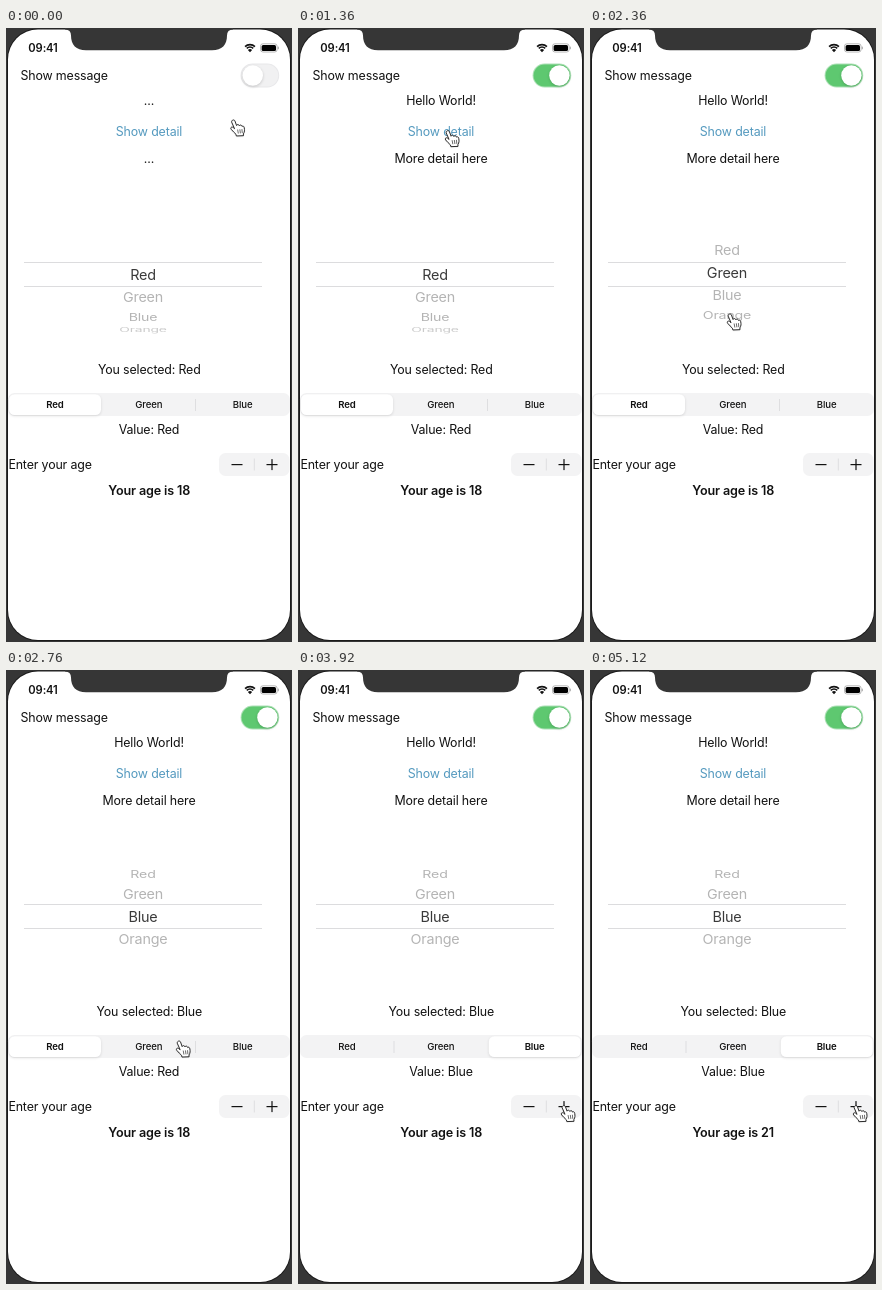
Write an HTML page with a canvas that moves like this. It is 286 by 614 pixels and loops after 5200 ms.

```html
<!DOCTYPE html>
<html lang="en">
<head>
<meta charset="utf-8">
<title>Form controls</title>
<style>
  html, body { margin: 0; width: 100%; height: 100%; overflow: hidden; background: #363636; }
  canvas { display: block; width: 286px; height: 614px; }
</style>
</head>
<body>
<canvas id="stage"></canvas>
<script>
const W = 286, H = 614, LOOP = 5200, STEP = 40;
const canvas = document.getElementById('stage');
const ctx = canvas.getContext('2d');
const dpr = window.devicePixelRatio || 1;
canvas.width = W * dpr;
canvas.height = H * dpr;

const INK = '#121212', BEZEL = '#363636', TRACK = '#f3f3f4', DIVIDER = '#dedee0', LINE = '#dcdcde';
const COLORS = ['Red', 'Green', 'Blue', 'Orange'];

// Pointer legs: start, end, target, optional control point of a curve
const START = [231.5, 99.8];
const LEGS = [
  { from: 0, to: 540, end: [260, 57] },
  { from: 740, to: 1180, end: [154, 110.5] },
  { from: 1400, to: 1970, end: [144, 293.8] },
  { from: 2470, to: 2990, end: [246, 383], bend: [140, 406] },
  { from: 3440, to: 3930, end: [270, 443.5] }
];
const PRESSES = [4120, 4480, 4920];

const clamp = v => Math.max(0, Math.min(1, v));
const progress = (t, a, b) => clamp((t - a) / (b - a));
const smooth = p => p * p * (3 - 2 * p);
const easeOut = p => 1 - (1 - p) ** 3;
const mix = (a, b, p) => a + (b - a) * p;
const mixRgb = (a, b, p) => `rgb(${a.map((v, i) => Math.round(mix(v, b[i], p))).join()})`;

function text(str, x, y, { size = 12.4, weight = 400, color = INK, align = 'center' } = {}) {
  ctx.font = `${weight} ${size}px Inter, "Liberation Sans", sans-serif`;
  ctx.letterSpacing = `${-0.012 * size}px`;
  ctx.textAlign = align;
  ctx.fillStyle = color;
  ctx.fillText(str, x, y);
}

function box(x, y, w, h, r, color) {
  ctx.beginPath();
  ctx.roundRect(x, y, w, h, r);
  ctx.fillStyle = color;
  ctx.fill();
}

function rect(x, y, w, h, color) {
  ctx.fillStyle = color;
  ctx.fillRect(x, y, w, h);
}

function withShadow(alpha, blur, dy, draw) {
  ctx.save();
  ctx.shadowColor = `rgba(0,0,0,${alpha})`;
  ctx.shadowBlur = blur * dpr;
  ctx.shadowOffsetY = dy * dpr;
  draw();
  ctx.restore();
}

function drawScreen() {
  rect(0, 0, W, H, BEZEL);
  box(1, 0.5, 284, 612.5, 31, '#1a1a1a');
  box(2, 1.5, 282, 610.5, 30, '#fff');
}

function drawNotch() {
  ctx.beginPath();
  ctx.moveTo(59, 0);
  ctx.lineTo(59, 1.5);
  ctx.quadraticCurveTo(65, 1.5, 65, 7.5);
  ctx.bezierCurveTo(65, 17, 70, 22.3, 80, 22.3);
  ctx.lineTo(206, 22.3);
  ctx.bezierCurveTo(216, 22.3, 221, 17, 221, 7.5);
  ctx.quadraticCurveTo(221, 1.5, 227, 1.5);
  ctx.lineTo(227, 0);
  ctx.fillStyle = BEZEL;
  ctx.fill();
}

function drawStatusBar() {
  text('09:41', 37, 24, { size: 11.2, weight: 600 });

  ctx.strokeStyle = ctx.fillStyle = INK;
  ctx.lineWidth = 1.6;
  for (const r of [7, 4.6]) {
    ctx.beginPath();
    ctx.arc(244, 23.6, r, -Math.PI * 0.75, -Math.PI * 0.25);
    ctx.stroke();
  }
  ctx.beginPath();
  ctx.moveTo(244, 24.2);
  ctx.arc(244, 24.2, 3, -Math.PI * 0.75, -Math.PI * 0.25);
  ctx.fill();

  ctx.beginPath();
  ctx.roundRect(254.5, 15.8, 16.6, 8.2, 2.4);
  ctx.strokeStyle = '#a5a5a5';
  ctx.lineWidth = 0.8;
  ctx.stroke();
  box(255.6, 16.9, 14.4, 6, 1.5, '#000');
  box(271.8, 18.6, 1, 2.6, 0.5, '#a5a5a5');
}

function drawToggle(t) {
  const p = progress(t, 560, 745);
  box(234.6, 35.6, 38.6, 23.8, 11.9, mixRgb([232, 232, 234], [172, 224, 181], p));
  box(235.6, 36.6, 36.6, 21.8, 10.9, mixRgb([241, 241, 242], [94, 200, 112], p));
  withShadow(0.18, 3, 1, () => {
    ctx.beginPath();
    ctx.arc(mix(246.8, 261.4, easeOut(p)), 47.5, 10.2, 0, Math.PI * 2);
    ctx.fillStyle = '#fff';
    ctx.fill();
  });
}

// Rows sit on a cylinder; the band in the middle shows them dark
function drawPickerRows(position, color) {
  COLORS.forEach((name, i) => {
    const row = i - position, angle = row * 0.385;
    if (Math.abs(angle) > 1.4) return;
    ctx.save();
    ctx.translate(137, 246.8 + 60.5 * Math.sin(angle));
    ctx.scale(0.94 + 0.06 * Math.cos(angle), Math.cos(angle));
    ctx.globalAlpha = Math.abs(row) > 2 ? mix(1, 0.7, Math.abs(row) - 2) : 1;
    text(name, 0, 5.2, { size: 14.4, color });
    ctx.restore();
  });
}

function drawPicker(t) {
  const position = 2 * smooth(progress(t, 2180, 2520));
  const bands = [[180, 54.5, '#b4b4b4'], [234.5, 24, '#3a3a3a'], [258.5, 48.5, '#b4b4b4']];
  for (const [y, h, color] of bands) {
    ctx.save();
    ctx.beginPath();
    ctx.rect(18, y, 238, h);
    ctx.clip();
    drawPickerRows(position, color);
    ctx.restore();
  }
  rect(18, 234, 238, 1, LINE);
  rect(18, 258, 238, 1, LINE);
}

function drawSegments(t) {
  const p = smooth(progress(t, 3120, 3400));
  const selected = p > 0.5 ? 2 : 0;
  box(2, 365, 282, 23, 6.5, TRACK);
  ctx.globalAlpha = 1 - p;
  rect(189, 371, 1, 12, DIVIDER);
  ctx.globalAlpha = p;
  rect(95.5, 371, 1, 12, DIVIDER);
  ctx.globalAlpha = 1;
  withShadow(0.12, 3, 1, () => box(mix(3, 190.8, p), 366.2, 92, 20.8, 5.5, '#fff'));
  COLORS.slice(0, 3).forEach((name, i) =>
    text(name, 49 + i * 93.8, 380, { size: 9.6, weight: i === selected ? 600 : 500 }));
}

function drawStepper(t) {
  box(213, 425, 70.5, 23, 6.5, TRACK);
  const press = PRESSES.find(start => t >= start && t < start + 160);
  if (press !== undefined) {
    const fade = 1 - smooth(progress(t, press + 60, press + 160));
    box(248.4, 425, 35.1, 23, [0, 6.5, 6.5, 0], `rgba(60,60,67,${0.12 * fade})`);
  }
  rect(247.8, 430.5, 1, 12, DIVIDER);
  rect(225.5, 436, 11, 1.2, INK);
  rect(260.5, 436, 11, 1.2, INK);
  rect(265.4, 431.1, 1.2, 11, INK);
}

function pointerAt(t) {
  let [x, y] = START;
  for (const { from, to, end, bend } of LEGS) {
    if (t < from) break;
    const s = smooth(progress(t, from, to));
    const [cx, cy] = bend || [(x + end[0]) / 2, (y + end[1]) / 2];
    const curve = (a, c, b) => (1 - s) ** 2 * a + 2 * s * (1 - s) * c + s * s * b;
    x = curve(x, cx, end[0]);
    y = curve(y, cy, end[1]);
  }
  return [x, y];
}

function drawPointer(t) {
  const hand = new Path2D(`M-6.2-6.4C-6.4-8.4-3.4-9-2.7-7.2L-1-2.4C-.6-3.8 1.5-3.8 2-2.1
    C2.5-3.4 4.4-3.2 4.8-1.4C5.6-2.3 7-1.6 7.1 0C7.5 2.5 7.6 4 6.2 6.4L6.3 8.3L-1.2 8.6L-1.6 6.8
    C-3.5 5.5-4.7 3.3-6.6 1.6C-8-.1-6-1.6-4.4-.2L-3.4.7Z`);
  const creases = new Path2D('M.2 2.2L.8 5.6M2.5 2L3 5.4M4.7 1.8L5 5.2');
  ctx.save();
  ctx.translate(...pointerAt(t));
  ctx.scale(0.95, 0.95);
  ctx.lineJoin = ctx.lineCap = 'round';
  ctx.fillStyle = '#fff';
  ctx.strokeStyle = '#222';
  ctx.lineWidth = 1;
  withShadow(0.2, 1.5, 0.5, () => ctx.fill(hand));
  ctx.stroke(hand);
  ctx.lineWidth = 0.7;
  ctx.stroke(creases);
  ctx.restore();
}

function draw(t) {
  ctx.setTransform(dpr, 0, 0, dpr, 0, 0);
  drawScreen();
  drawNotch();
  drawStatusBar();

  text('Show message', 14.5, 51.8, { align: 'left' });
  drawToggle(t);
  text(t < 600 ? '...' : 'Hello World!', 143, 77);
  text('Show detail', 143, 108, { color: '#559abf' });
  text(t < 1320 ? '...' : 'More detail here', 143, 135.4);

  drawPicker(t);
  text(`You selected: ${t < 2520 ? 'Red' : 'Blue'}`, 143.3, 346);

  drawSegments(t);
  text(`Value: ${t < 3320 ? 'Red' : 'Blue'}`, 143, 406);

  text('Enter your age', 2.4, 441.3, { align: 'left' });
  drawStepper(t);
  const age = 18 + PRESSES.filter(start => t >= start + STEP).length;
  text(`Your age is ${age}`, 143.2, 466.8, { size: 12.6, weight: 600 });

  drawPointer(t);
}

const origin = performance.now();
function tick() {
  const t = (performance.now() - origin) % LOOP;
  draw(Math.floor(t / STEP) * STEP);
  requestAnimationFrame(tick);
}
tick();
</script>
</body>
</html>
```
